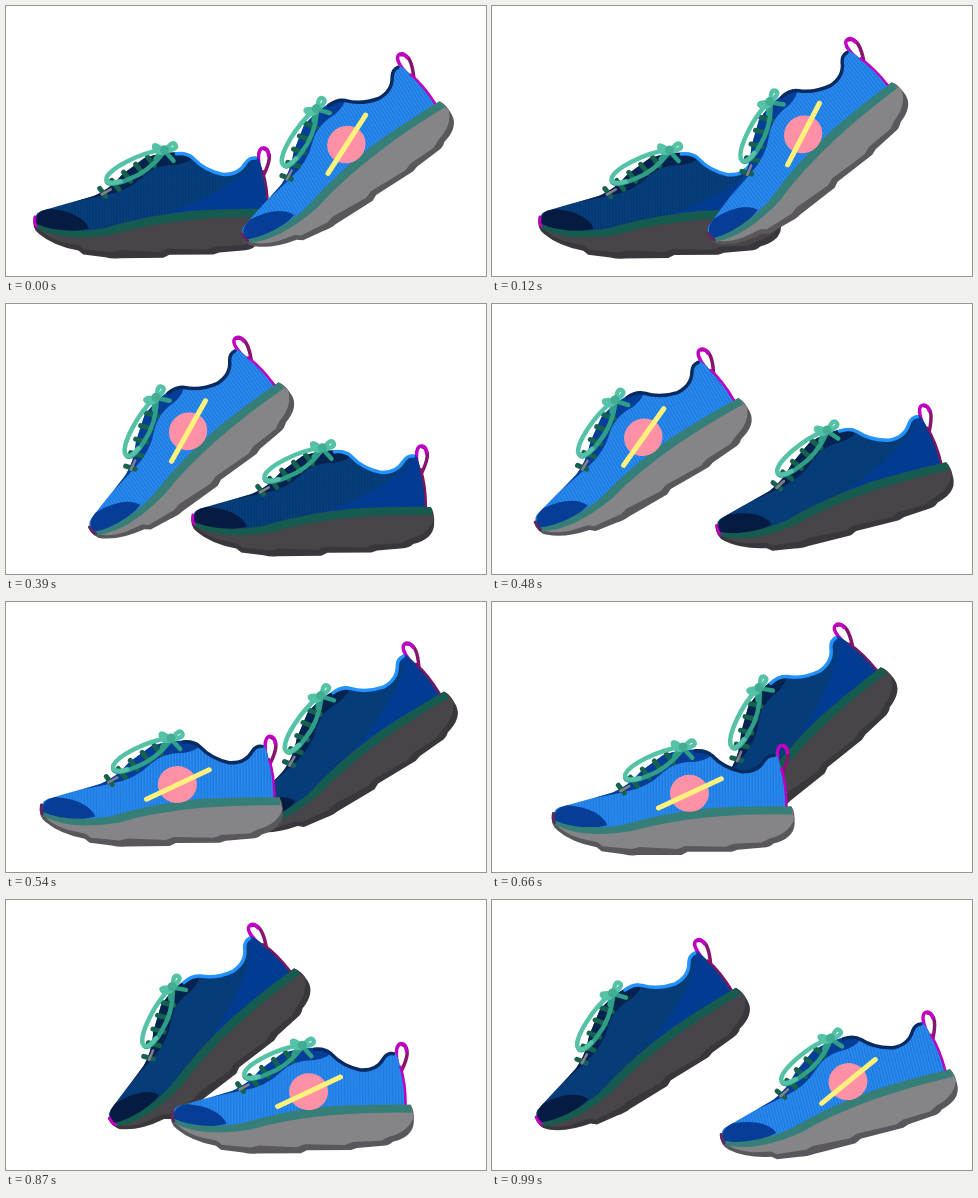
An HTML page that plays this animation: 480 px wide and 270 px high, repeating every 1.02 s.

```html
<!DOCTYPE html>
<html>
<head>
<meta charset="utf-8">
<title>Walking shoes</title>
<style>
html, body { margin: 0; width: 100%; height: 100%; overflow: hidden; background: #fff; }
svg { display: block; width: 100vw; height: 100vh; }
#near {
  --knit: #2990fc; --panel: #063d96; --cap: #063d96; --quarter: none; --collar: #062a62;
  --band: #357f78; --sole: #858486; --tread: #59575c; --tip: #63285a; --strip: #bd00c0;
}
#far {
  --knit: #07407f; --panel: #04234f; --cap: #051b42; --quarter: #023c92; --collar: #2492ff;
  --band: #155b50; --sole: #474549; --tread: #39363c; --tip: #bd00c0; --strip: #7b1762;
}
.line { fill: none; stroke-linecap: round; stroke-linejoin: round; }
</style>
</head>
<body>
<svg viewBox="0 0 480 270">
  <defs>
    <pattern id="rib" width="3" height="3" patternUnits="userSpaceOnUse">
      <path d="M1 0V3" stroke="#001a45" stroke-opacity=".34"/>
    </pattern>
    <path id="upper" d="M103 215Q101 207 112 205Q140 197 160 192Q176 186 190 170L212 154Q240 145 258 151Q270 165 290 171Q306 172 313 160Q318 152 325 154Q333 170 335 208L262 212Q215 217 170 227Q125 231 103 219Z"/>
    <g id="shoe">
      <!-- heel loop -->
      <g class="line" stroke-width="3.5">
        <path d="M332 146C340 149 337 160 331 172" stroke="#86156f"/>
        <path d="M329 174C323 151 327 144 332 145Q336 146 336 152" stroke="#c000c3"/>
      </g>
      <!-- sole -->
      <path d="M101 211Q98 223 106 229Q120 241 145 246L150 250L172 253Q180 255 186 254L230 254L236 251L280 251L286 249L312 247Q318 247 322 243Q342 238 343 224Q344 212 340 206Z" fill="var(--tread)"/>
      <path d="M102 217Q105 229 128 237L146 241L151 245L180 248L188 246L226 248L234 245L274 246L282 243L310 242L318 238Q338 233 343 218L340 207Z" fill="var(--sole)"/>
      <!-- upper -->
      <use href="#upper" fill="var(--knit)"/>
      <use href="#upper" fill="url(#rib)"/>
      <path d="M203 218Q270 203 316 167L320 154L325 154Q333 170 335 208L262 210Z" fill="var(--quarter)"/>
      <path d="M142 197L162 191Q177 185 190 170L212 154Q240 145 259 152Q262 158 244 161Q224 160 211 172Q196 187 172 191Z" fill="var(--panel)"/>
      <path d="M103 219Q101 207 116 204Q148 207 156 224Q130 231 103 219Z" fill="var(--cap)"/>
      <path class="line" d="M244 150Q255 149 261 155Q272 167 290 171Q306 172 313 160Q317 154 323 155" stroke="var(--collar)" stroke-width="3.5"/>
      <path class="line" d="M330 168Q335 184 335 206" stroke="var(--strip)" stroke-width="2.5"/>
      <path d="M103 219Q128 230 170 224Q215 211 262 207Q300 205 340 206L341 214Q300 213 262 216Q215 220 180 230Q130 238 103 223Z" fill="var(--band)"/>
      <path class="line" d="M102 212Q101 217 103 221" stroke="var(--tip)" stroke-width="3"/>
      <!-- laces -->
      <path class="line" d="M167 184l6 8M179 176l7 9M191 168l7 9M203 160l7 9M215 153l7 9" stroke="#17614f" stroke-width="5"/>
      <path class="line" d="M169 190l9-5" stroke="#877f8b" stroke-width="2.5"/>
      <g class="line" stroke="#2f9e86" stroke-width="4.5">
        <path d="M174 176C174 182 188 179 196 175Q216 168 231 149"/>
        <path d="M232 147L241 157M230 146L223 155"/>
      </g>
      <g class="line" stroke="#55c2a8" stroke-width="4.5">
        <path d="M230 146C206 149 178 164 174 173C172 180 182 179 188 177"/>
        <path d="M231 146Q220 138 222 144T232 148Q240 136 243 141T232 147"/>
      </g>
      <circle cx="232" cy="146" r="4.5" fill="#43ad94"/>
    </g>
  </defs>
  <g id="far"><use href="#shoe"/></g>
  <g id="near">
    <use href="#shoe"/>
    <ellipse cx="238" cy="192.5" rx="19.5" ry="18.5" fill="#ff91a6"/>
    <path class="line" d="M207 207L270 178" stroke="#fff27c" stroke-width="5"/>
  </g>
</svg>
<script>
const LOOP = 1020, STEP = 30;

// Each pose: time, toe x, toe y, angle
const walks = {
  far: [
    [0, 27, 212, -.5], [120, 46, 212, -.4], [270, 125, 212, -.4], [390, 185, 212, -.5],
    [480, 223, 223, -14], [540, 236, 219, -31], [630, 217, 220, -37.5],
    [750, 158.5, 221, -40.5], [900, 88, 220, -36.5], [990, 43, 219, -31.5]
  ],
  near: [
    [0, 235, 230, -32.5], [120, 215, 229.5, -38], [270, 137, 227, -40.5], [390, 82.5, 225, -36],
    [480, 42, 220, -30], [540, 33.5, 204, -.4], [630, 50, 212, -.3],
    [750, 100, 213, 0], [900, 181, 213, -.5], [990, 227.5, 236, -14.5]
  ]
};

const slope = (a, b, k) => a && b ? (b[k] - a[k]) / (b[0] - a[0]) : 0;

// Tangent that never overshoots the neighbouring poses
function tangent(keys, i, k) {
  const a = slope(keys[i - 1], keys[i], k), b = slope(keys[i], keys[i + 1], k);
  if (!keys[i - 1]) return b;
  if (!keys[i + 1]) return a;
  return a * b > 0 ? 2 * a * b / (a + b) : 0;
}

function pose(keys, t) {
  let i = 0;
  while (i < keys.length - 2 && keys[i + 1][0] <= t) i++;
  const p = keys[i], q = keys[i + 1], span = q[0] - p[0], u = (t - p[0]) / span;
  const ease = u * u * (3 - 2 * u);
  return [1, 2, 3].map(k =>
    p[k] + (q[k] - p[k]) * ease +
    span * u * (1 - u) * ((1 - u) * tangent(keys, i, k) - u * tangent(keys, i + 1, k)));
}

function draw(now) {
  const t = Math.floor(now % LOOP / STEP) * STEP;
  for (const id in walks) {
    const [x, y, angle] = pose(walks[id], t);
    document.getElementById(id).setAttribute("transform",
      `translate(${x} ${y}) rotate(${angle}) translate(-100 -213)`);
  }
}

let start;
function tick(now) {
  start ??= now;
  draw(now - start);
  requestAnimationFrame(tick);
}
draw(0);
requestAnimationFrame(tick);
</script>
</body>
</html>
```
